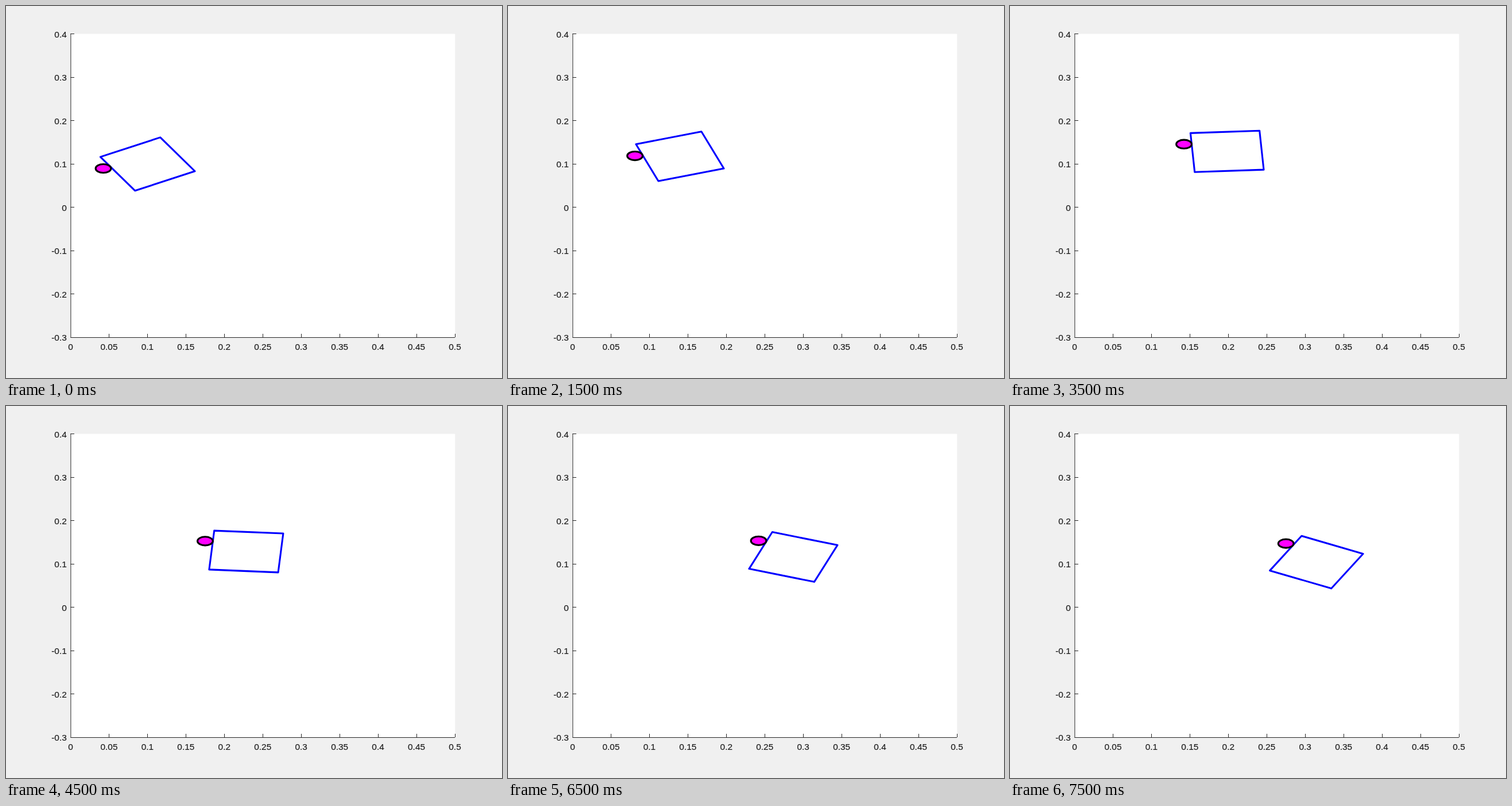
Write an HTML page that moves like this. It is 864 px wide and 648 px high and loops after 8 s.

```html
<!DOCTYPE html>
<html lang="en">
<head>
<meta charset="utf-8">
<title>Pushed square</title>
<style>
  html, body { margin: 0; width: 100%; height: 100%; overflow: hidden; background: #f0f0f0; }
  svg { display: block; width: 864px; height: 648px; }
  text { font: 15.43px "Liberation Sans", Arial, sans-serif; fill: #1c1c1c; stroke: #1c1c1c; stroke-width: 0.15; }
  #axes path { stroke: #262626; fill: none; }
</style>
</head>
<body>
<svg viewBox="0 0 864 648">
  <rect x="112.9" y="48.5" width="669.3" height="528.5" fill="#fff"/>
  <g id="axes"></g>
  <path id="box" fill="none" stroke="#00f" stroke-width="3.09" stroke-linejoin="round"/>
  <ellipse id="pusher" rx="13.4" ry="7.55" fill="#f0f" stroke="#000" stroke-width="3.09"/>
</svg>
<script>
const axes = document.getElementById('axes');
const box = document.getElementById('box');
const pusher = document.getElementById('pusher');

// Plot units to pixels
const X = v => 112.8 + 1339 * v;
const Y = v => 350.8 - 755 * v;
const snap = p => Math.floor(p) + 0.5;

function drawAxes() {
  let line = 'M112.9 48V577.5H782';
  let labels = '';
  const label = (x, y, anchor, v) => {
    labels += `<text x="${x}" y="${y}" text-anchor="${anchor}">${v}</text>`;
  };
  for (let i = 0; i <= 10; i++) {
    const v = i / 20, x = X(v);
    if (i) line += `M${snap(x)} 577v-6`;
    label(x - 0.3, 599, 'middle', v);
  }
  for (let i = -3; i <= 4; i++) {
    const v = i / 10, y = Y(v);
    line += `M112.5 ${snap(y)}h6.5`;
    label(105.8, y + 5.8, 'end', v);
  }
  axes.innerHTML = `<path d="${line}"/>${labels}`;
}

const STEP = 500, LOOP = 8000;
const HALF = 0.045;   // half the side of the square
const RADIUS = 0.2237; // turning radius of its centre
const START = Math.PI / 6;

function draw(ms) {
  const n = Math.floor(ms % LOOP / STEP);
  const angle = n ? (30.45 - 3.85 * n) * Math.PI / 180 : START;
  const sin = Math.sin(angle), cos = Math.cos(angle);
  const cx = 0.1 + RADIUS * (Math.sin(START) - sin);
  const cy = 0.1 + RADIUS * (cos - Math.cos(START)) - 0.00005 * n;
  const place = (x, y) => [X(cx + x * cos - y * sin), Y(cy + x * sin + y * cos)];

  const corners = [[-1, -1], [1, -1], [1, 1], [-1, 1]];
  box.setAttribute('d', 'M' + corners.map(([x, y]) => place(x * HALF, y * HALF)).join('L') + 'Z');

  const [px, py] = place(-0.055, 0.02);
  pusher.setAttribute('cx', px);
  pusher.setAttribute('cy', py);
}

drawAxes();
const begin = performance.now();
function tick() {
  draw(performance.now() - begin);
  requestAnimationFrame(tick);
}
tick();
</script>
</body>
</html>
```
